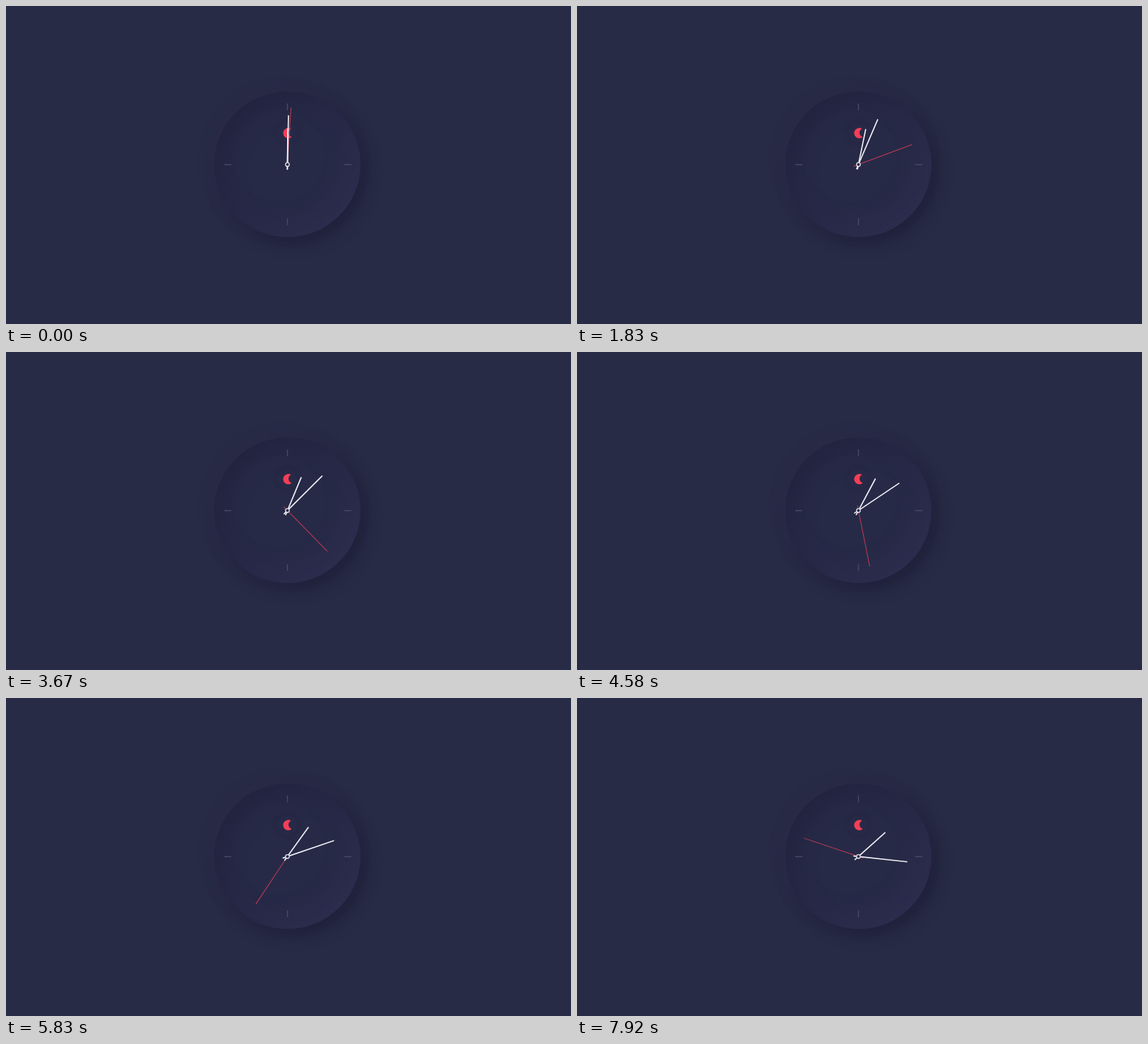
Recreate the animation shown at these times as an HTML page. Size 800 px wide and 450 px high, loop 8 s.

```html
<!DOCTYPE html>
<html lang="en">
<head>
<meta charset="utf-8">
<title>Clock</title>
<style>
  html, body { margin: 0; width: 100%; height: 100%; overflow: hidden; background: #272b46; }
  .stage { position: relative; width: 800px; height: 450px; overflow: hidden; }
  .face, .moon-dial { position: absolute; border-radius: 50%; }
  .face {
    left: 295px; top: 121px; width: 207px; height: 206px;
    background: #272a47;
    box-shadow:
      -5px -5px 18px rgba(54, 46, 78, .28),
      9px 9px 20px rgba(25, 26, 49, .55),
      inset 12px 12px 28px rgba(32, 32, 59, .6),
      inset -12px -12px 30px rgba(52, 50, 86, .6);
  }
  .moon-dial {
    left: 384px; top: 165px; width: 29px; height: 29px;
    box-shadow:
      0 0 6px rgba(29, 30, 56, .45),
      inset 0 0 5px rgba(46, 45, 75, .25);
  }
  svg { position: absolute; inset: 0; }
</style>
</head>
<body>
<div class="stage">
  <div class="face"></div>
  <div class="moon-dial"></div>
  <svg width="800" height="450" viewBox="0 0 800 450">
    <g id="ticks" stroke="#484a66" stroke-width="1.4"></g>
    <path d="M403.6 173.7A7.3 7.3 0 1 0 404.6 185.3A6.2 6.2 0 0 1 403.6 173.7Z" fill="#f43f57"/>
    <g id="hands" stroke-linecap="round"></g>
    <circle cx="398.5" cy="224.3" r="2.7" fill="#292b48" stroke="#e4e4ed" stroke-width="1.3"/>
  </svg>
</div>
<script>
  const CX = 398.5, CY = 224.3;
  const LOOP = 8000, FPS = 12, START = 0.1;

  function line(parent, x1, y1, x2, y2, attrs = {}) {
    const el = document.createElementNS('http://www.w3.org/2000/svg', 'line');
    for (const [key, value] of Object.entries({ x1, y1, x2, y2, ...attrs })) {
      el.setAttribute(key, value);
    }
    return document.getElementById(parent).appendChild(el);
  }

  function hand(length, tail, width, color, speed) {
    const el = line('hands', CX, CY + tail, CX, CY - length, { stroke: color, 'stroke-width': width });
    return { el, speed };
  }

  line('ticks', 398.5, 138, 398.5, 147.5);
  line('ticks', 398.5, 300.5, 398.5, 310);
  line('ticks', 309, 224.5, 319, 224.5);
  line('ticks', 479, 224.5, 489, 224.5);

  // Speeds are in degrees per second.
  const hands = [
    hand(80.5, 7, 1, '#c43a55', 36),
    hand(50.5, 6.5, 1.7, '#eeeef4', 6),
    hand(69, 6.5, 1.7, '#eeeef4', 12)
  ];

  function draw(ms) {
    // The clock advances in steps; 4 ms absorbs rounding at step edges.
    const step = Math.floor((ms % LOOP + 4) * FPS / 1000) % (LOOP * FPS / 1000);
    const seconds = step / FPS + START;
    for (const { el, speed } of hands) {
      el.setAttribute('transform', `rotate(${speed * seconds} ${CX} ${CY})`);
    }
  }

  const origin = performance.now();
  function tick() {
    draw(performance.now() - origin);
    requestAnimationFrame(tick);
  }
  tick();
</script>
</body>
</html>
```
